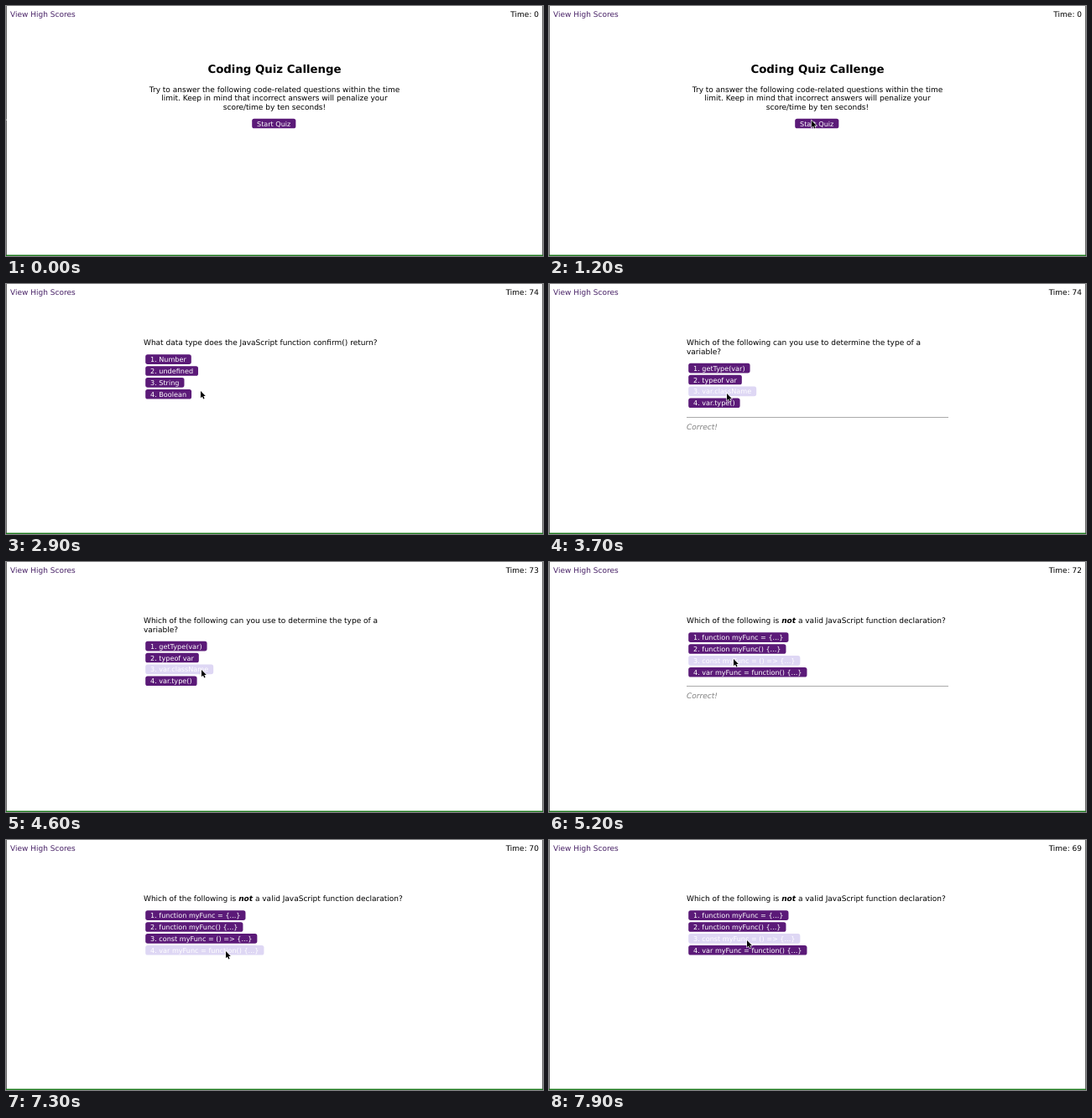
An HTML page with a canvas that plays this animation: 640x299 px, repeating every 8000 ms.

```html
<!DOCTYPE html>
<html lang="en">
<head>
<meta charset="utf-8">
<title>Coding Quiz</title>
<style>
html, body { margin: 0; width: 100%; height: 100%; overflow: hidden; background: #fff; }
canvas { display: block; width: 640px; height: 299px; }
</style>
</head>
<body>
<canvas id="stage"></canvas>
<script>
const LOOP = 8000, STEP = 100;
const PURPLE = '#5b1a78', PALE = '#ded7f4';
const BODY = '9px', SMALL = '8.1px', LINE = 10.55, ROW = 13.87;

const canvas = document.getElementById('stage');
const ctx = canvas.getContext('2d');
const ratio = window.devicePixelRatio || 1;
canvas.width = 640 * ratio;
canvas.height = 299 * ratio;

const questions = [
  { start: 1850, lines: ['What data type does the JavaScript function confirm() return?'],
    answers: ['Number', 'undefined', 'String', 'Boolean'] },
  { start: 3600, lines: ['Which of the following can you use to determine the type of a', 'variable?'],
    answers: ['getType(var)', 'typeof var', 'var.className', 'var.type()'] },
  { start: 5150, lines: ['Which of the following is *not* a valid JavaScript function declaration?'],
    answers: ['function myFunc = {...}', 'function myFunc() {...}',
      'const myFunc = () => {...}', 'var myFunc = function() {...}'] }
];

// Pointer path: time, x, y
const path = [
  [100, -6, 130], [900, 313, 137], [1200, 313, 137], [1400, 315, 140], [2050, 315, 140],
  [2350, 300, 156], [2600, 265, 159], [2700, 265, 159], [2900, 232, 128], [3300, 212, 131],
  [3900, 212, 131], [4600, 233, 129], [5000, 220, 116], [5500, 220, 116], [6200, 298, 147],
  [6400, 296, 160], [6900, 285, 170], [7300, 262, 133], [7700, 236, 120]
];

function pointerAt(t) {
  const next = path.findIndex(p => p[0] > t);
  if (next < 1) return (next ? path[path.length - 1] : path[0]).slice(1);
  const [t0, x0, y0] = path[next - 1], [t1, x1, y1] = path[next];
  const k = (t - t0) / (t1 - t0);
  return [x0 + (x1 - x0) * k, y0 + (y1 - y0) * k];
}

function text(str, x, y, { size = BODY, style = '', color = '#000', align = 'left' } = {}) {
  ctx.font = `${style} ${size} "DejaVu Sans", Verdana, sans-serif`;
  ctx.fillStyle = color;
  ctx.textAlign = align;
  ctx.fillText(str, x, y);
  return ctx.measureText(str).width;
}

// Parts between asterisks are emphasised
function richText(str, x, y) {
  str.split('*').forEach((part, i) => {
    x += text(part, x, y, { style: i % 2 ? 'italic bold' : '' });
  });
}

function button(label, x, y, [px, py], canHover = true) {
  ctx.font = `${SMALL} "DejaVu Sans", Verdana, sans-serif`;
  const w = ctx.measureText(label).width + 11.8, h = 11.6;
  const hover = canHover && px >= x && px <= x + w && py >= y && py <= y + h;
  ctx.fillStyle = hover ? PALE : PURPLE;
  ctx.beginPath();
  ctx.roundRect(x, y, w, h, 2.6);
  ctx.fill();
  text(label, x + 5.8, y + 8.8, { size: SMALL, color: '#fff' });
}

function drawIntro(t, pointer) {
  text('Coding Quiz Callenge', 320, 79.7, { size: '13.3px', style: 'bold', align: 'center' });
  ['Try to answer the following code-related questions within the time',
    'limit. Keep in mind that incorrect answers will penalize your',
    'score/time by ten seconds!'
  ].forEach((line, i) => text(line, 320, 102.6 + i * LINE, { align: 'center' }));
  button('Start Quiz', 293.2, 134.7, pointer, t >= 1300);
}

function drawQuestion(q, t, pointer) {
  const shift = (q.lines.length - 1) * LINE;
  q.lines.forEach((line, i) => richText(line, 164, 73.2 + i * LINE));
  q.answers.forEach((a, i) => button(`${i + 1}. ${a}`, 166.2, 84.3 + shift + i * ROW, pointer));
  if (q !== questions[0] && t < q.start + 1000) {
    ctx.fillStyle = '#aaa';
    ctx.fillRect(164, Math.round(148 + shift), 312, 1);
    text('Correct!', 164, 163.4 + shift, { style: 'italic', color: '#808080' });
  }
}

function drawPointer([x, y]) {
  const arrow = new Path2D('M0 0V8.2L1.9 6.5 3.2 9.5 4.6 8.9 3.3 6H5.8Z');
  ctx.save();
  ctx.translate(x, y);
  ctx.strokeStyle = '#fff';
  ctx.lineWidth = 1.2;
  ctx.stroke(arrow);
  ctx.fillStyle = '#000';
  ctx.fill(arrow);
  ctx.restore();
}

function draw(t) {
  const pointer = pointerAt(t);
  const question = questions.filter(q => t >= q.start).pop();
  const seconds = question ? 75 - Math.max(0, Math.floor((t - 1900) / 1000)) : 0;

  ctx.setTransform(ratio, 0, 0, ratio, 0, 0);
  ctx.textRendering = 'geometricPrecision';
  ctx.fillStyle = '#fff';
  ctx.fillRect(0, 0, 640, 299);
  ctx.fillStyle = '#666';
  ctx.fillRect(0, 0, 1, 298);
  ctx.fillRect(639, 0, 1, 298);
  ctx.fillStyle = '#1c7a1c';
  ctx.fillRect(0, 297.6, 640, 1.4);

  text('View High Scores', 5, 13.3, { color: '#4a2468' });
  text(`Time: ${seconds}`, 635, 13.3, { align: 'right' });
  if (question) drawQuestion(question, t, pointer);
  else drawIntro(t, pointer);
  drawPointer(pointer);
}

function tick() {
  const t = performance.now() % LOOP;
  draw(Math.floor(t / STEP) * STEP);
  requestAnimationFrame(tick);
}
tick();
</script>
</body>
</html>
```
